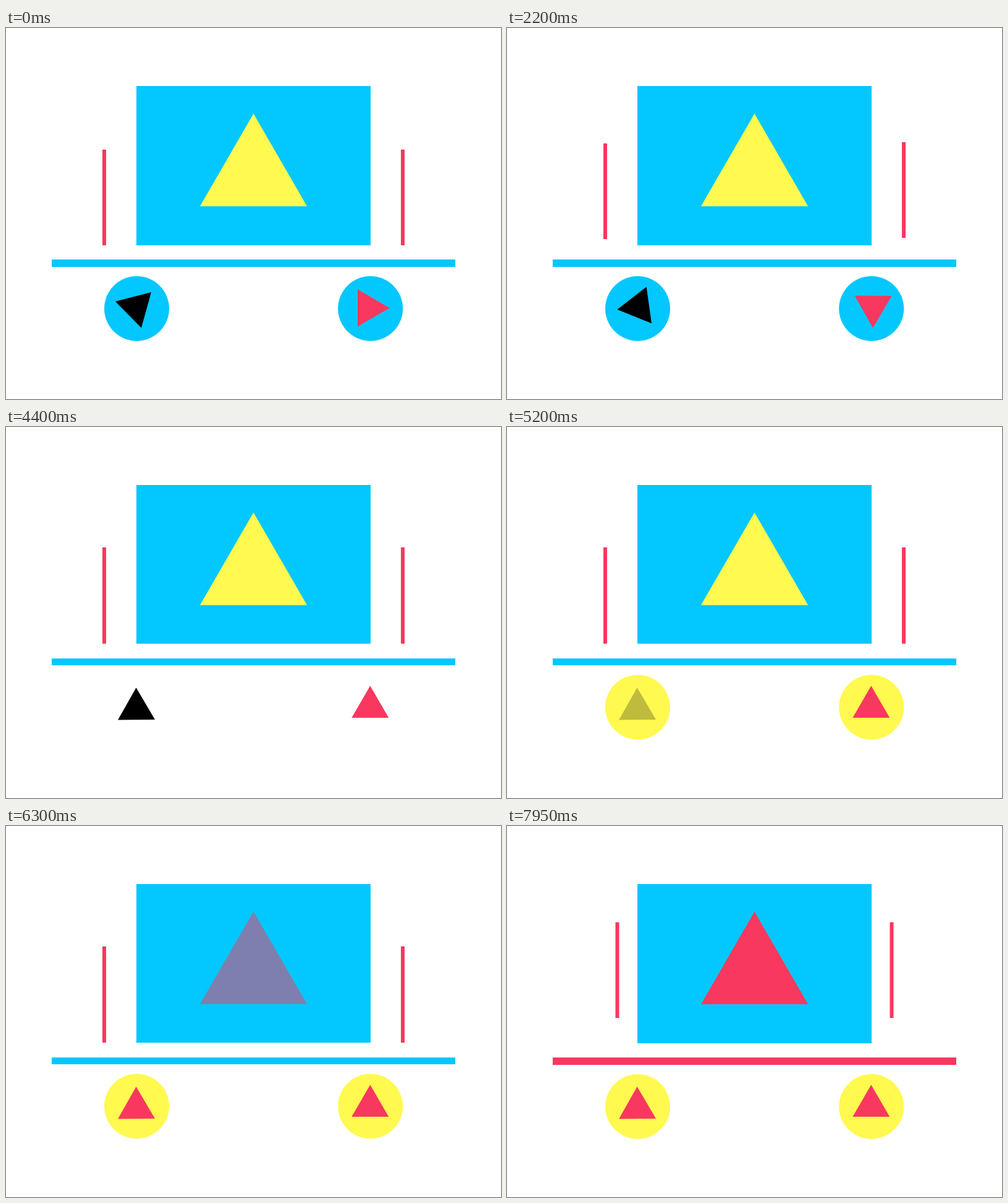
These frames come from a looping animation (801 px wide and 601 px high, 8 s). An HTML page with a canvas:

```html
<!DOCTYPE html>
<html lang="en">
<head>
<meta charset="utf-8">
<title>Shapes on wheels</title>
<style>
  html, body { margin: 0; width: 100%; height: 100%; overflow: hidden; background: #fff; }
  canvas { display: block; }
</style>
</head>
<body>
<canvas id="stage" width="801" height="601"></canvas>
<script>
const ctx = document.getElementById('stage').getContext('2d');
const LOOP = 8000;
const CYAN = '#03c7ff', YELLOW = '#fff950', RED = '#f9385f', BLACK = '#000';

// Each key: step, x, y, angle in degrees
const LEFT_TRI = [
  [0, 210.3, 452.3, 45.5], [7, 211.8, 452.3, 27.4],
  [15, 213.5, 450.2, 16.8], [19, 210.9, 456.9, -0.5]
];
const RIGHT_TRI = [
  [0, 586.3, 453.5, 90], [7, 591.7, 452, 65.8],
  [15, 593, 450.2, 55], [19, 589.3, 453.8, 0]
];
// Each key: step, top of left bar, top of right bar
const BARS = [[0, 197, 197], [7, 189, 187], [15, 184, 182], [19, 195, 195]];

// The picture advances in steps that get shorter: 200, 100, then 50 ms
function stepAt(t) {
  if (t < 4200) return Math.floor(t / 200);
  if (t < 7300) return 21 + Math.floor((t - 4200) / 100);
  return 52 + Math.floor((t - 7300) / 50);
}

function poseAt(keys, n) {
  const i = keys.findIndex(k => k[0] > n);
  if (i < 0) return keys[keys.length - 1].slice(1);
  const a = keys[i - 1], b = keys[i];
  const p = (n - a[0]) / (b[0] - a[0]);
  return a.slice(1).map((v, j) => v + (b[j + 1] - v) * p);
}

// Old colour leaves in quarters, then the new one arrives in quarters
function swap(n, start, from, to, hold = 0) {
  const k = n - start + 1;
  if (k < 4) return [from, Math.min(1, 1 - k / 4)];
  return [to, Math.max(0, Math.min(1, (k - 4 - hold) / 4))];
}

function paint([color, alpha]) {
  ctx.globalAlpha = alpha;
  ctx.fillStyle = color;
}

function rect(x, y, w, h, fill) {
  paint(fill);
  ctx.fillRect(x, y, w, h);
}

function disc(x, y, r, fill) {
  paint(fill);
  ctx.beginPath();
  ctx.arc(x, y, r, 0, Math.PI * 2);
  ctx.fill();
}

function triangle(x, y, r, angle, fill) {
  paint(fill);
  ctx.beginPath();
  for (let i = 0; i < 3; i++) {
    const a = (angle - 90 + i * 120) * Math.PI / 180;
    ctx.lineTo(x + r * Math.cos(a), y + r * Math.sin(a));
  }
  ctx.fill();
}

function draw(t) {
  const n = stepAt(t);
  const settled = n >= 19 && n < 53 ? 1 : 0;
  const solidRed = [RED, 1];
  ctx.globalAlpha = 1;
  ctx.fillStyle = '#fff';
  ctx.fillRect(0, 0, 801, 601);

  rect(211, 94, 379, 258 - settled, [CYAN, 1]);
  triangle(400.5, 238.8 - settled * 0.3, 100, 0, swap(n, 37, YELLOW, RED));

  rect(74, 375, 653, 12 - settled, swap(n, 45, CYAN, RED));

  const [leftTop, rightTop] = poseAt(BARS, n);
  const moved = Math.max(0, n - 52);
  const inward = moved * 1.5, up = moved * 3;
  const height = 155 + settled;
  rect(156 + inward, Math.round(leftTop) - up, 6, height, solidRed);
  rect(639 - inward, Math.round(rightTop) - up, 6, height, solidRed);

  const wheel = swap(n, 20, CYAN, YELLOW, 1);
  const wheelY = 454.5 - settled * 0.5;
  disc(211.5, wheelY, 52.5, wheel);
  disc(589.7, wheelY, 52.5, wheel);

  const [lx, ly, la] = poseAt(LEFT_TRI, n);
  const [rx, ry, ra] = poseAt(RIGHT_TRI, n);
  triangle(lx, ly, 34.6, la, swap(n, 29, BLACK, RED));
  triangle(rx, ry, 34.6, ra, solidRed);
}

const begin = performance.now();
function tick() {
  draw((performance.now() - begin) % LOOP);
  requestAnimationFrame(tick);
}
tick();
</script>
</body>
</html>
```
